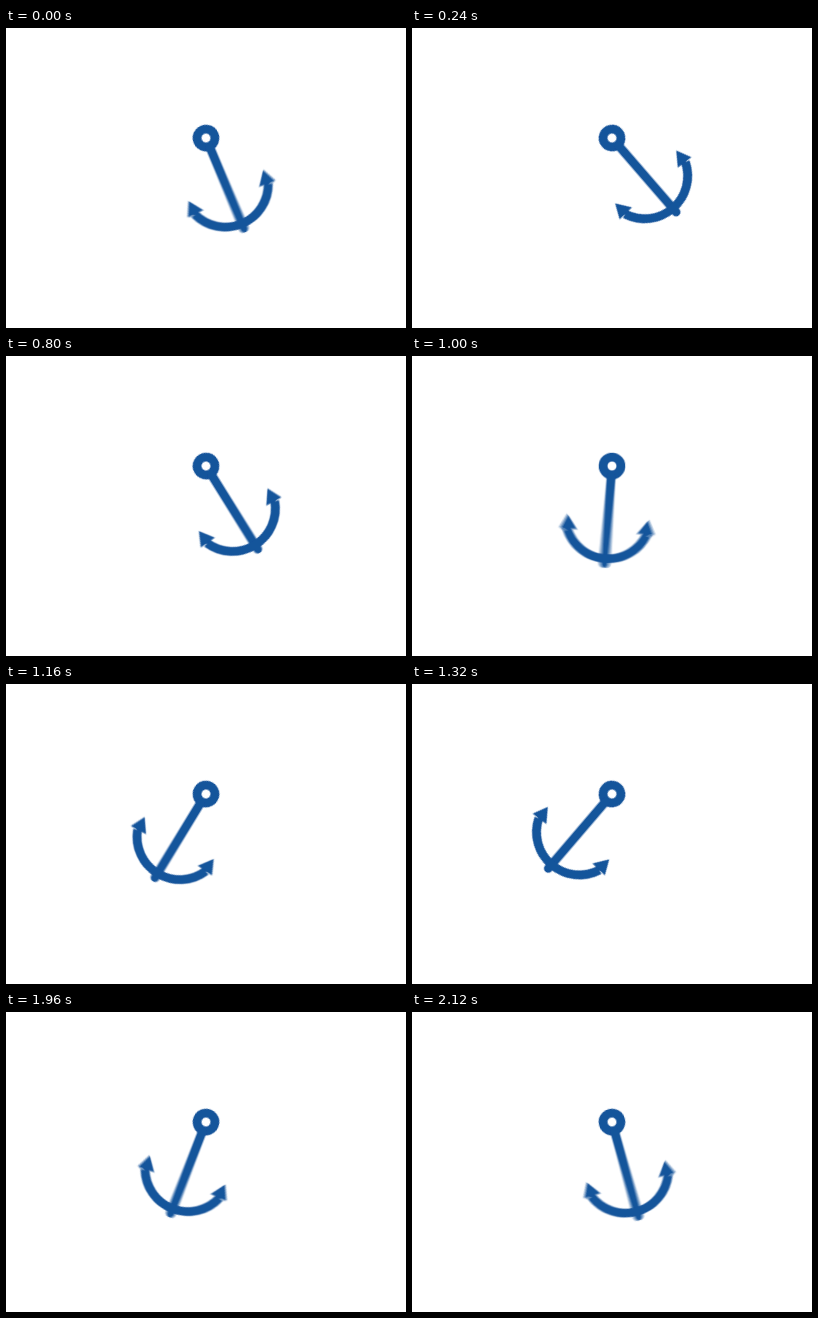
An HTML page that plays this animation: 400x300 px, repeating every 2160 ms.

```html
<!DOCTYPE html>
<html lang="en">
<head>
<meta charset="utf-8">
<title>Swinging anchor</title>
<style>
  html, body { margin: 0; width: 100%; height: 100%; overflow: hidden; background: #fff; }
  svg { display: block; width: 400px; height: 300px; }

  .blur { isolation: isolate; }

  /* Five copies, 3 ms apart, add up to a short motion blur. */
  .blur use {
    --delay: calc(-1714ms + var(--i) * 3ms);
    opacity: .2;
    mix-blend-mode: plus-lighter;
    transform-origin: 0 0;
    animation: swing 2160ms cubic-bezier(.69, 0, .31, 1) var(--delay) infinite;
  }

  @keyframes swing {
    0%, 99.26%, 100% { transform: rotate(-43.3deg); }
    49.81% { transform: rotate(43.3deg); }
  }
</style>
</head>
<body>
<svg viewBox="0 0 400 300">
  <defs>
    <path id="fluke" d="M40.4 51.5 L30.3 65.4 L47.5 66.6 Z" fill="#125199"/>
    <g id="anchor">
      <g fill="none" stroke="#125199" stroke-width="8.8">
        <circle r="8.9"/>
        <path d="M0 10 V97.8" stroke-linecap="round"/>
        <path d="M-39.9 66 A43 43 0 0 0 39.9 66"/>
      </g>
      <use href="#fluke"/>
      <use href="#fluke" transform="scale(-1 1)"/>
    </g>
  </defs>
  <g transform="translate(200 110)">
    <g class="blur">
      <use href="#anchor" style="--i: -2"/>
      <use href="#anchor" style="--i: -1"/>
      <use href="#anchor" style="--i: 0"/>
      <use href="#anchor" style="--i: 1"/>
      <use href="#anchor" style="--i: 2"/>
    </g>
  </g>
</svg>
</body>
</html>
```
